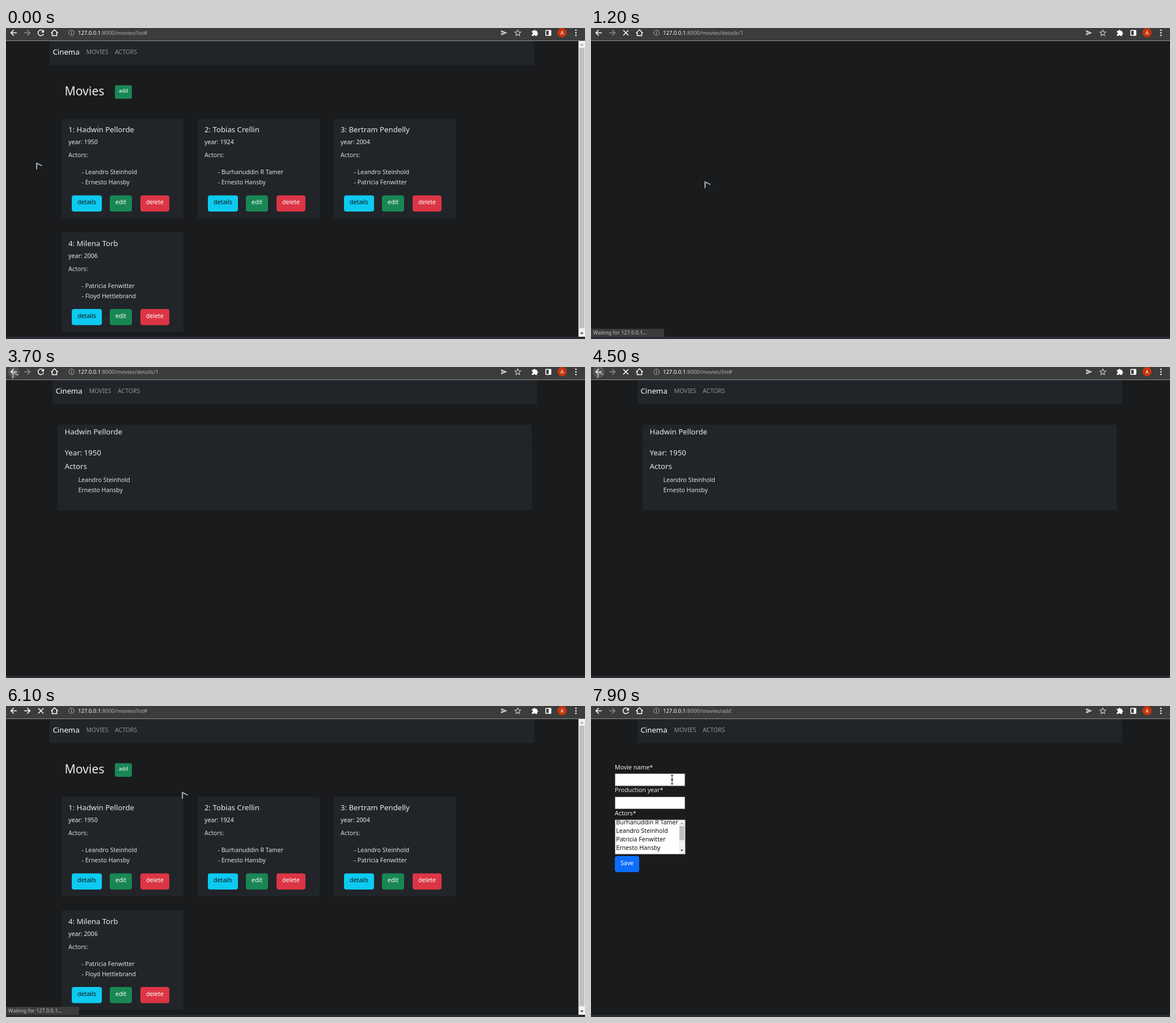
These frames come from a looping animation (1021 px wide and 549 px high, 8 s). An HTML page:

```html
<!DOCTYPE html>
<html lang="en">
<head>
<meta charset="utf-8">
<title>Cinema</title>
<style>
html, body { margin: 0; width: 100%; height: 100%; overflow: hidden; background: #1a1b1c; }
svg { display: block; width: 1021px; height: 549px; font-family: "Noto Sans", "Open Sans", sans-serif; }
text { white-space: pre; }

.list, .details, .form, .url-list, .url-details, .url-add, .fwd, .reload, .stop,
.tip-details, .tip-wait, .tip-add, .hot-details, .hot-add, .hot-back, .arrow, .beam {
  animation: 8s step-end infinite;
}
.list { animation-name: list; }
.details { animation-name: details; }
.form { animation-name: form; }
.url-list { animation-name: url-list; }
.url-details { animation-name: url-details; }
.url-add { animation-name: url-add; }
.fwd { animation-name: fwd; }
.reload { animation-name: reload; }
.stop { animation-name: stop; }
.tip-details { animation-name: tip-details; }
.tip-wait { animation-name: tip-wait; }
.tip-add { animation-name: tip-add; }
.hot-details { animation-name: hot-details; }
.hot-add { animation-name: hot-add; }
.hot-back { animation-name: hot-back; }
.arrow { animation-name: arrow; }
.beam { animation-name: beam; }

@keyframes list { 0%, 62.5% { visibility: visible } 13.75%, 81.25%, to { visibility: hidden } }
@keyframes details { 0%, 62.5%, to { visibility: hidden } 16.25% { visibility: visible } }
@keyframes form { 0% { visibility: hidden } 88.75%, to { visibility: visible } }
@keyframes url-list { 0%, 51.25% { visibility: visible } 13.75%, 81.25%, to { visibility: hidden } }
@keyframes url-details { 0%, 51.25%, to { visibility: hidden } 13.75% { visibility: visible } }
@keyframes url-add { 0% { visibility: hidden } 81.25%, to { visibility: visible } }
@keyframes fwd { 0%, 81.25%, to { stroke: #8b8b8b } 58.75% { stroke: #fff } }
@keyframes reload {
  0%, 28.75%, 66.25%, 98.75%, to { visibility: visible }
  11.25%, 48.75%, 76.25% { visibility: hidden }
}
@keyframes stop {
  0%, 28.75%, 66.25%, 98.75%, to { visibility: hidden }
  11.25%, 48.75%, 76.25% { visibility: visible }
}
@keyframes tip-details { 0%, 11.25%, to { visibility: hidden } 8.75% { visibility: visible } }
@keyframes tip-wait {
  0%, 21.25%, 81.25%, to { opacity: 0 }
  11.25%, 76.25% { opacity: 1 }
  20% { opacity: .5 }
}
@keyframes tip-add { 0%, 76.25%, to { visibility: hidden } 72.5% { visibility: visible } }
@keyframes hot-details { 0%, 13.75%, to { visibility: hidden } 8.75% { visibility: visible } }
@keyframes hot-add { 0%, 76.25%, to { visibility: hidden } 72.5% { visibility: visible } }
@keyframes hot-back { 0%, 48.75%, 58.75%, to { visibility: hidden } 45%, 56.25% { visibility: visible } }
@keyframes arrow {
  0% { transform: translate(53px, 237px) }
  6.25% { transform: translate(72px, 259px) }
  7.5% { transform: translate(97px, 289px) }
  8.75% { transform: translate(128px, 301px) }
  10% { transform: translate(141px, 306px) }
  13.75% { transform: translate(160px, 296px) }
  15% { transform: translate(200px, 270px) }
  16.25% { transform: translate(227px, 250px) }
  26.25% { transform: translate(79px, 271px) }
  27.5% { transform: translate(77px, 250px) }
  28.75% { transform: translate(76px, 224px) }
  30% { transform: translate(75px, 203px) }
  31.25% { transform: translate(75px, 192px) }
  37.5% { transform: translate(64px, 150px) }
  38.75% { transform: translate(42px, 88px) }
  40% { transform: translate(22px, 42px) }
  41.25% { transform: translate(14px, 26px) }
  43.75% { transform: translate(13px, 20px) }
  45% { transform: translate(12px, 13px) }
  46.25% { transform: translate(11px, 8px) }
  48.75% { transform: translate(52px, 138px); visibility: visible }
  51.25% { transform: translate(52px, 138px); visibility: hidden }
  56.25% { transform: translate(11px, 7px); visibility: visible }
  58.75% { transform: translate(85px, 155px) }
  66.25% { transform: translate(174px, 110px) }
  70% { transform: translate(205px, 111px) }
  76.25% { transform: translate(310px, 151px) }
  88.75% { transform: translate(276px, 150px); visibility: visible }
  96.25%, to { transform: translate(276px, 150px); visibility: hidden }
}
@keyframes beam {
  0% { visibility: hidden; transform: translate(153px, 133px) }
  96.25% { visibility: visible; transform: translate(153px, 133px) }
  98.75%, to { visibility: visible; transform: translate(143px, 130px) }
}
</style>
</head>
<body>
<svg id="stage" viewBox="0 0 1021 549"></svg>
<script>
const BODY = 10.65, HEAD = 13.2, LIGHT = '#e9ebed', CARD = '#212529';
const GREEN = '#198754', RED = '#dc3545', CYAN = '#0dcaf0';

const text = (x, y, s, size = BODY, fill = LIGHT, weight = 400, more = '') =>
  `<text x="${x}" y="${y}" font-size="${size}" fill="${fill}" font-weight="${weight}" ${more}>${s}</text>`;
const box = (x, y, w, h, fill, r = 0, more = '') =>
  `<rect x="${x}" y="${y}" width="${w}" height="${h}" rx="${r}" fill="${fill}" ${more}/>`;
const path = (d, more = '') => `<path d="${d}" ${more}/>`;
const group = (cls, ...parts) => `<g class="${cls}">${parts.join('')}</g>`;
const line = (color, width) => `fill="none" stroke="${color}" stroke-width="${width}"`;
const button = (x, y, w, h, fill, label, ink = '#fff', cls = '') =>
  group(cls, box(x, y, w, h, fill, 4),
    text(x + w / 2, y + 15.8, label, BODY, ink, 400, 'text-anchor="middle"'));

const lead = 'Leandro Steinhold', second = 'Ernesto Hansby',
      third = 'Burhanuddin R Tamer', fourth = 'Patricia Fenwitter';
const movies = [
  ['Hadwin Pellorde', 1950, lead, second],
  ['Tobias Crellin', 1924, third, second],
  ['Bertram Pendelly', 2004, lead, fourth],
  ['Milena Torb', 2006, fourth, 'Floyd Hettlebrand']
];

const nav = x => box(x, 23, 854.5, 42.5, CARD) +
  text(x + 5.5, 46.5, 'Cinema', HEAD, '#fff') +
  text(x + 64.5, 46, 'MOVIES', 10.5, '#909295') +
  text(x + 115, 46, 'ACTORS', 10.5, '#909295');

function card([name, year, ...cast], i) {
  const dash = x => box(x, 312.5, 3, 1, '#27508c');
  return `<g transform="translate(${i % 3 * 240} ${i > 2 ? 200.6 : 0})">` +
    box(98, 160, 215, 176, CARD, 4) +
    text(110, 184, `${i + 1}: ${name}`, HEAD, LIGHT, 500) +
    text(110, 205, `year: ${year}`, BODY, LIGHT, 500) +
    text(110, 228, 'Actors:', BODY, '#d5d7d9') +
    cast.map((who, n) => text(133.5, 258 + 18 * n, '- ' + who, BODY, '#dee0e2')).join('') +
    button(116, 295.5, 53, 28.5, CYAN, 'details', '#111') +
    (i ? '' : button(116, 295.5, 53, 28.5, '#31d2f2', 'details', '#111', 'hot-details')) +
    dash(174) + button(183, 295.5, 39, 28.5, GREEN, 'edit') +
    dash(228) + button(237, 295.5, 51, 28.5, RED, 'delete') + '</g>';
}

const addButton = (fill, cls) => group(cls,
  box(192, 101, 30, 24, fill, 3), text(198.7, 114.3, 'add', 9.2, '#fff'));

const listPage = group('list',
  nav(77),
  text(103.5, 119, 'Movies', 21.2, LIGHT),
  addButton(GREEN, ''), addButton('#157347', 'hot-add'),
  movies.map(card).join(''),
  box(1009.5, 23, 11.5, 522, '#f1f1f1'),
  box(1011, 35, 9, 495, '#c1c1c1'),
  path('M1012.5 31l3-3.5 3 3.5z', 'fill="#a3a3a3"'),
  path('M1012.5 537.5l3 3.5 3-3.5z', 'fill="#505050"'));

const detailsPage = group('details',
  nav(82),
  box(91, 102, 836, 151, CARD, 4),
  box(91, 131.5, 836, 1, '#1b1e21'),
  text(103.5, 119.3, movies[0][0], HEAD, LIGHT, 500),
  text(103.5, 156.3, 'Year: 1950', HEAD, LIGHT, 500),
  text(103.5, 180, 'Actors', HEAD, LIGHT, 500),
  text(127.5, 203.3, lead, BODY, '#dee0e2'),
  text(127.5, 221.3, second, BODY, '#dee0e2'));

const field = (y, h, w = 123) => box(42.5, y, w, h, '#fff', 0, 'stroke="#858585"');
const formPage = group('form',
  nav(82),
  text(42, 112, 'Movie name*'), field(119.5, 21.5),
  text(42, 152.3, 'Production year*'), field(160.5, 21),
  text(42, 193, 'Actors*'), field(201, 60.5, 123.5),
  '<clipPath id="clip"><rect x="43" y="201.5" width="112" height="59.5"/></clipPath>',
  '<g clip-path="url(#clip)">',
  [third, lead, fourth, second].map((who, i) =>
    text(44.2, 209.3 + 15 * i, who, BODY, '#111')).join(''),
  '</g>',
  box(155, 201.5, 10.5, 59.5, '#f1f1f1'),
  box(156, 212, 8.5, 25, '#c1c1c1'),
  path('M157.5 208.5l2.7-3 2.7 3z', 'fill="#a3a3a3"'),
  path('M157.5 253.5l2.7 3 2.7-3z', 'fill="#444"'),
  button(42, 264.8, 43, 28.5, '#0d6efd', 'Save'));

const url = (cls, tail) =>
  `<text class="${cls}" x="127" y="12" font-size="9.5" fill="#b0b0b0"><tspan fill="#fff">127.0.0.1</tspan>:8000/movies/${tail}</text>`;

const toolbar = [
  box(0, 0, 1021, 22, '#3c3c3c'),
  box(0, 22, 1021, 1, '#8c8c8c'),
  '<circle class="hot-back" cx="13.5" cy="8.5" r="10.5" fill="#555"/>',
  path('M19 8.5H9M13.7 3.5l-5 5 5 5', line('#fff', 1.6)),
  path('M32 8.5h10M37.3 3.5l5 5-5 5', 'class="fwd" ' + line('#8b8b8b', 1.6)),
  group('reload',
    path('M65.2 5.2A5 5 0 1 0 66.3 10', line('#fff', 1.5)),
    path('M67 3v5h-5z', 'fill="#fff"')),
  path('M57 4l9 9M66 4l-9 9', 'class="stop" ' + line('#fff', 1.6)),
  path('M79.5 9l6-6 6 6M81.5 7.5v6h8v-6', line('#fff', 1.5)),
  `<circle cx="115.5" cy="8.5" r="4.7" ${line('#b5b5b5', 1)}/>`,
  path('M115.5 7.7v3.4M115.5 5.7v1.1', line('#b5b5b5', 1.1)),
  url('url-list', 'list#'), url('url-details', 'details/1'), url('url-add', 'add'),
  path('M873 4l11 4.5-11 4.5v-3.5l6-1-6-1z', 'fill="#c9c9c9"'),
  path('M902.5 3.4l1.5 3.4 3.7.4-2.8 2.5.8 3.7-3.2-1.9-3.2 1.9.8-3.7-2.8-2.5 3.7-.4z', line('#d0d0d0', 1.1)),
  path('M927.5 5h2.8a1.7 1.7 0 0 1 3.4 0h2.8v2.8a1.7 1.7 0 0 1 0 3.4V14h-3a1.6 1.6 0 0 0-3.2 0h-2.8v-3a1.6 1.6 0 0 0 0-3.2z', 'fill="#fff"'),
  box(951.8, 4.3, 9, 8.6, 'none', .5, 'stroke="#fff" stroke-width="1.5"'),
  box(957, 4, 4, 9, '#fff'),
  '<circle cx="980.5" cy="8.3" r="8.2" fill="#c5350c"/>',
  text(980.5, 11.6, 'A', 8.8, '#fff', 400, 'text-anchor="middle"'),
  ...[4, 8.5, 13].map(y => `<circle cx="1005" cy="${y}" r="1.3" fill="#fff"/>`)
].join('');

const tip = (cls, label, w) => group(cls,
  path(`M0 531h${w - 3}a3 3 0 0 1 3 3v11H0z`, 'fill="#3c3c3c"'),
  text(4, 541.3, label, 9, '#c4c4c4'));

const pointers =
  path('M0 0L11.5 5.8 10 7 2.2 3.6V11.4L0 13.5z', 'class="arrow" fill="#9ca8aa"') +
  group('beam',
    path('M0-8.5v17M-2-6.5l2-2 2 2M-2 6.5l2 2 2-2', line('#4a4f52', 1.1)),
    path('M0-3l2.2 3-2.2 3-2.2-3z', 'fill="#4a4f52"'));

document.getElementById('stage').innerHTML =
  box(0, 0, 1021, 549, '#1a1b1c') + listPage + detailsPage + formPage +
  box(0, 545, 1021, 4, '#292c32') + toolbar +
  tip('tip-details', '127.0.0.1:8000/movies/details/1', 147) +
  tip('tip-add', '127.0.0.1:8000/movies/add', 128) +
  tip('tip-wait', 'Waiting for 127.0.0.1...', 129) + pointers;
</script>
</body>
</html>
```
